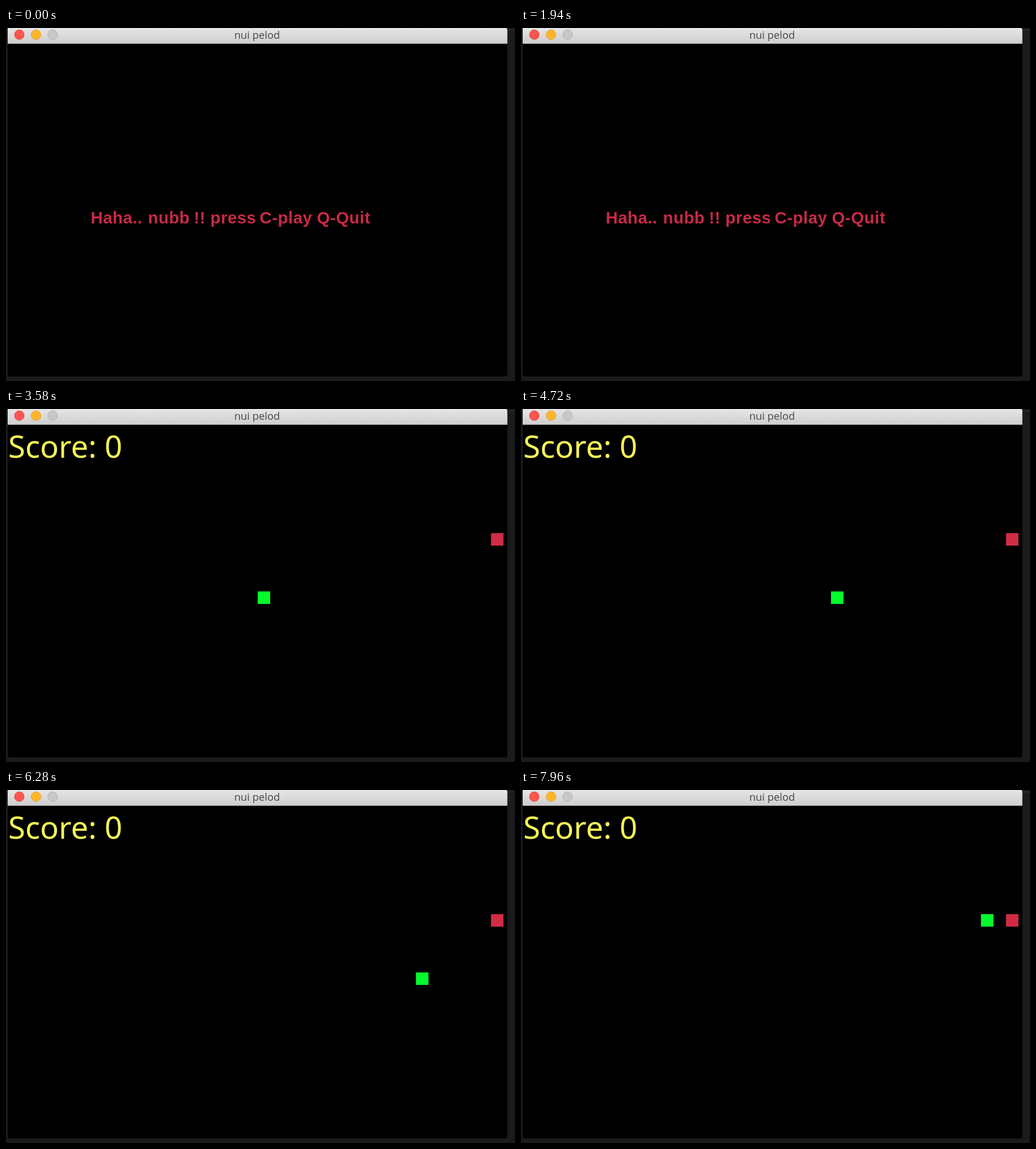
Animation of 898 by 623 pixels, one loop 8000 ms. Source, as an HTML page:

```html
<!DOCTYPE html>
<html lang="en">
<head>
<meta charset="utf-8">
<title>Snake game</title>
<style>
  html, body { margin: 0; width: 100%; height: 100%; overflow: hidden; background: #1b1b1d; }
  svg { display: block; width: 898px; height: 623px; }
  .title { font: 18.4px "Open Sans", "Noto Sans", sans-serif; fill: #484848; text-anchor: middle; }
  .message { font: bold 29.4px "Liberation Sans", Arial, sans-serif; letter-spacing: .5px; fill: #c82a46; }
  .score { font: 54.5px "Noto Sans", "Open Sans", sans-serif; fill: #fafa55; }
</style>
</head>
<body>
<svg viewBox="0 0 898 623">
  <defs>
    <linearGradient id="bar" x2="0" y2="1">
      <stop stop-color="#e6e6e6"/>
      <stop offset="1" stop-color="#cecece"/>
    </linearGradient>
  </defs>
  <rect width="898" height="623" fill="#1b1b1d"/>
  <path d="M885 3.5H898" stroke="#34343a"/>
  <path d="M3 27H884.5V611Q884.5 615 881 615H7Q3 615 3 611Z"/>
  <path d="M3 0H883Q884.5 1 884.5 4V27H3Z" fill="url(#bar)"/>
  <path d="M3 27.5H884.5" stroke="#a0a0a6"/>
  <g>
    <circle cx="23.5" cy="11.7" r="8.5" fill="#fc5650" stroke="#e0443e"/>
    <circle cx="53" cy="11.7" r="8.5" fill="#fdb62c" stroke="#dfa023"/>
    <circle cx="82.3" cy="11.7" r="8.5" fill="#c8c8c8" stroke="#b0b0b0"/>
  </g>
  <text class="title" x="443" y="19">nui pelod</text>

  <text id="gameOver" class="message" y="345">
    <tspan x="149.5">Haha..</tspan>
    <tspan x="250.5">nubb</tspan>
    <tspan x="331.5">!!</tspan>
    <tspan x="360.5">press</tspan>
    <tspan x="447.5">C-play</tspan>
    <tspan x="548.5">Q-Quit</tspan>
  </text>

  <g id="game">
    <text class="score" x="4" y="86">Score: 0</text>
    <!-- The board is 1200 x 800 units -->
    <g transform="translate(3 28) scale(.735)">
      <rect x="1160" y="260" width="30" height="30" fill="#d02c46"/>
      <rect id="snake" width="30" height="30" fill="#05fa2d"/>
    </g>
  </g>
</svg>
<script>
  const LOOP = 8000, GAME_START = 2960;
  const STEP = 10, START = { x: 600, y: 400 }, TURN_AFTER = 50;
  const [gameOver, game, snake] = ["gameOver", "game", "snake"].map(id => document.getElementById(id));

  // Pictures come in bursts of three: 20, 20 and 100 ms.
  function pictureIndex(time) {
    const shifted = time + 60;
    return 3 * Math.floor(shifted / 140) + Math.min(2, Math.floor(shifted % 140 / 20));
  }

  function draw(time) {
    const playing = time >= GAME_START;
    gameOver.style.display = playing ? "none" : "";
    game.style.display = playing ? "" : "none";

    // The snake runs right, then turns up.
    const steps = Math.max(0, Math.floor(0.71 * pictureIndex(time) - 58.6));
    snake.setAttribute("x", START.x + STEP * Math.min(steps, TURN_AFTER));
    snake.setAttribute("y", START.y - STEP * Math.max(0, steps - TURN_AFTER));
  }

  const origin = performance.now();
  function tick() {
    draw((performance.now() - origin) % LOOP);
    requestAnimationFrame(tick);
  }
  tick();
</script>
</body>
</html>
```
